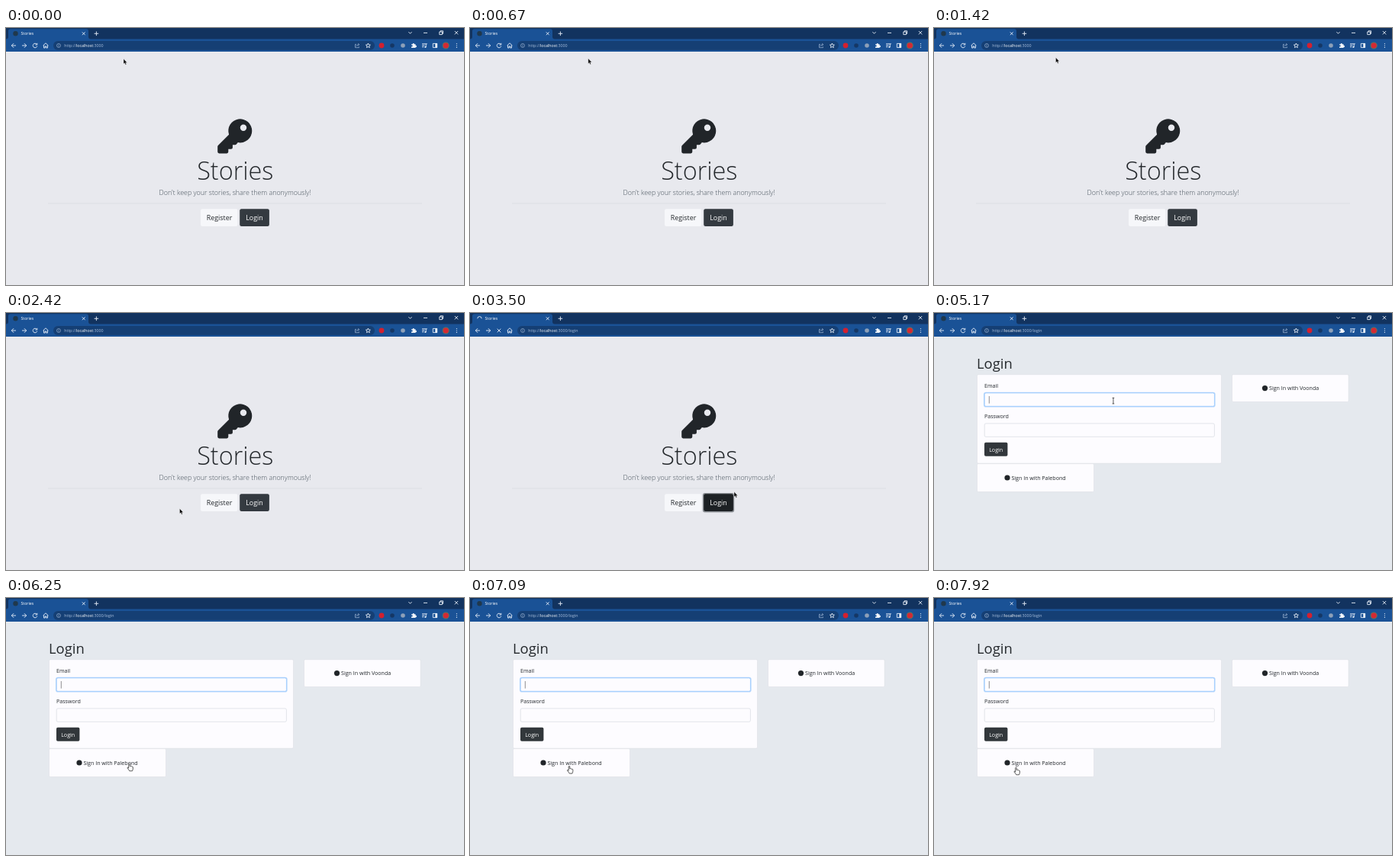
Animation, 600 px wide and 337 px high, one loop 8000 ms. Source, as an HTML page:

```html
<!DOCTYPE html>
<html lang="en">
<head>
<meta charset="utf-8">
<title>Stories</title>
<style>
  html, body { margin: 0; width: 100%; height: 100%; overflow: hidden; background: #e7e9ee; }
  svg { display: block; width: 100vw; height: 100vh; }
  text { font-family: "Open Sans", "Noto Sans", sans-serif; fill: #24282c; }
  .mid { text-anchor: middle; }
  .small { font-size: 5.3px; fill: #fff; }
  .body { font-size: 7.1px; }
  .large { font-size: 8.9px; }
  .light { font-weight: 300; }
  .white { fill: #fff; }
  .line { fill: none; stroke: #eaf1fa; stroke-width: .9; }
  .dim { stroke: #a9bfdc; }
  .card { fill: #fdfcff; stroke: #d9dbe0; stroke-width: .5; }
  .field { fill: #fdfcff; stroke: #ced4da; stroke-width: .6; }
  .dark { fill: #32373b; }
</style>
</head>
<body>
<svg viewBox="0 0 600 337" preserveAspectRatio="none">
  <g id="home">
    <rect y="31" width="600" height="306" fill="#e8e9ee"/>
    <g transform="translate(277.2 119.4) scale(.088)" fill="#212529">
      <path fill-rule="evenodd" d="M512 176A176 176 0 0 1 303 349L279 376Q272 384 261 384H224V424Q224 448 200 448H160V488Q160 512 136 512H24Q0 512 0 488V410Q0 400 7 393L169 231A176 176 0 1 1 512 176ZM336 128a48 48 0 1 0 96 0a48 48 0 1 0-96 0Z"/>
    </g>
    <text class="mid light" x="300.3" y="199" font-size="32.4">Stories</text>
    <text class="mid light" x="300" y="218.8" font-size="8.9" style="fill:#46515b">Don't keep your stories, share them anonymously!</text>
    <path d="M55 230H545" stroke="#d5d7dc" stroke-width=".6"/>
    <rect id="register" x="255" y="237.3" width="48.5" height="22.8" rx="2.3"/>
    <text class="mid large" x="279.5" y="252.3">Register</text>
    <rect id="ring" x="304.8" y="236" width="41.4" height="25.4" rx="3" fill="#8f9398"/>
    <rect id="enter" x="306.2" y="237.3" width="38.7" height="22.8" rx="2.3"/>
    <text class="mid large white" x="325.5" y="252.3">Login</text>
  </g>

  <g id="login">
    <rect y="31" width="600" height="306" fill="#e5e9ee"/>
    <text x="56" y="72.6" font-size="18.4" font-weight="500">Login</text>
    <rect class="card" x="56.5" y="80.7" width="320" height="116.4" rx="1.6"/>
    <text class="body" x="66" y="98">Email</text>
    <rect id="halo" x="65" y="103.7" width="303.6" height="19.8" rx="2.8" fill="#b9d8fb"/>
    <rect id="email" class="field" x="66.2" y="104.9" width="301.2" height="17.4" rx="1.8"/>
    <path id="caret" d="M72.3 109V118.6" stroke="#444" stroke-width=".6"/>
    <text class="body" x="66" y="138">Password</text>
    <rect class="field" x="66.2" y="144.9" width="301.2" height="17.4" rx="1.8"/>
    <rect class="dark" x="66" y="169.8" width="30.4" height="18" rx="1.8"/>
    <text class="body mid white" x="81.2" y="181.5">Login</text>
    <rect class="card" x="56.5" y="197.6" width="153" height="37" rx="1.6"/>
    <circle cx="96" cy="216" r="3.6" fill="#212529"/>
    <text class="body" x="101.4" y="218.6">Sign In with Palebond</text>
    <rect class="card" x="390.5" y="80.7" width="152.6" height="35.8" rx="1.6"/>
    <circle cx="433.5" cy="98.6" r="3.6" fill="#212529"/>
    <text class="body" x="439" y="101.2">Sign In with Voonda</text>
  </g>

  <g id="browser">
    <rect width="600" height="16" fill="#12335f"/>
    <path d="M0 31V14.5Q3 14.5 3 11.5V4Q3 1.2 6 1.2H105Q108 1.2 108 4V11.5Q108 14.5 111 14.5H600V31Z" fill="#1a5296"/>
    <circle id="icon" cx="12.5" cy="7.3" r="3.2" fill="#20384c"/>
    <path id="spinner" class="line" d="M9.8 7.3A2.7 2.7 0 0 0 12.5 10A2.7 2.7 0 0 0 15.2 7.3" stroke-width=".8"/>
    <text class="small" x="19.4" y="9.3">Stories</text>
    <path class="line" d="M99.8 5.4l3.8 3.8m0-3.8l-3.8 3.8M115.6 7.3h5.6m-2.8-2.8v5.6"/>
    <path class="line" stroke-width=".8" d="M527.4 5.2l2.1 2.1 2.1-2.1M547 6.4h5M567.8 5h3.6v3.6h-3.6zM569 5V3.8h3.6v3.6h-1.2M587.8 4l4.4 4.4m0-4.4l-4.4 4.4"/>
    <path class="line" d="M13 23H7.3m2.8-2.8L7.3 23l2.8 2.8M21 23h5.7m-2.8-2.8l2.8 2.8-2.8 2.8"/>
    <path id="reload" class="line" d="M40.2 21.2A2.8 2.8 0 1 0 40.8 23.7M40.8 19.8V22H38.5"/>
    <path id="stop" class="line" d="M35.7 20.7l4.6 4.6m0-4.6l-4.6 4.6"/>
    <path class="line" d="M48.6 23l3.4-3.2 3.4 3.2M49.6 22.5v3.6h1.6V24h1.6v2.1h1.6v-3.6"/>
    <rect x="62" y="17" width="421" height="12" rx="6" fill="#153f74"/>
    <g class="line dim" stroke-width=".6">
      <circle cx="69" cy="23" r="2.5" stroke-width=".6"/>
      <path d="M69 22.6v1.8M69 21.3v.6" stroke-width=".7"/>
      <path d="M459 21.4h-1.5v4.3h5v-1.2M459 24q.3-2.3 3.6-2.3m-1.4-1.5l1.6 1.5-1.6 1.5" stroke-width=".7"/>
    </g>
    <text class="small" x="76.3" y="25" style="fill:#a9bfdc">http://<tspan fill="#fff">localhost</tspan><tspan>:3000</tspan><tspan id="path"></tspan></text>
    <path class="line" stroke-width=".6" d="M474.4 20l.9 2 2.1.2-1.6 1.4.5 2.1-1.9-1.1-1.9 1.1.5-2.1-1.6-1.4 2.1-.2z"/>
    <circle cx="492" cy="23" r="3.4" fill="#d3202f"/>
    <circle cx="506" cy="23" r="2.8" fill="#153764"/>
    <circle cx="520" cy="23" r="2.8" fill="#8da0b8"/>
    <path fill="#f2f6fb" d="M531 21.2h1.7a1.1 1.1 0 1 1 2.2 0h1.7V23a1.1 1.1 0 1 1 0 2.1V26H531v-1.7a1.1 1.1 0 1 0 0-1.8z"/>
    <path class="line" d="M545 20.8h5.2M545 22.8h3.4M545 24.8h2.4M550.2 25V20.8h1.6"/>
    <circle cx="549.4" cy="25" r="1.1" fill="#eaf1fa"/>
    <path class="line" d="M559.3 20.4h5.4v5.2h-5.4z"/>
    <path fill="#eaf1fa" d="M562.3 20h2.5v6h-2.5z"/>
    <circle cx="576.2" cy="23" r="4.1" fill="#d42a33" stroke="#4f7d68" stroke-width=".9"/>
    <path d="M590.4 20.6v.01m0 2.39v.01m0 2.39v.01" stroke="#eaf1fa" stroke-width="1.2" stroke-linecap="round"/>
  </g>

  <g id="cursor">
    <path id="arrow" d="M0 0V6.6L1.5 5.3 2.5 7.7 3.7 7.2 2.7 4.9H4.7Z" fill="#080808" stroke="#fff" stroke-width=".35"/>
    <path id="hand" d="M-.8.6Q0-.5.8.6V3.6Q1.7 2.9 2.3 3.8 3.1 3.2 3.7 4.2 4.7 3.8 4.8 5V7Q4.7 8.3 3.9 9.8H.3Q-.6 8.1-2.4 6.2-2.8 5-1.8 5.2L-.8 6.1Z" fill="#fff" stroke="#151515" stroke-width=".7"/>
    <path id="beam" d="M-1.3-3.8H1.3M0-3.8V3.8M-1.3 3.8H1.3" stroke="#151515" stroke-width=".7"/>
  </g>
</svg>
<script>
const LOOP = 8000, STEP = 1000 / 12;
const CLICK = 3400, LOADED = 3740, FOCUS = 4700, BLINK = 530;

// time, x, y of the pointer tip
const route = [
  [0, 154, 40.5], [900, 155, 40], [1420, 159.5, 38.8], [1720, 160, 42],
  [2330, 227, 256], [2500, 228, 257], [2700, 244, 259], [3080, 322, 253],
  [3400, 333, 247], [3500, 346, 234.5], [3800, 392, 160], [4170, 408.5, 142],
  [4350, 390, 136], [4660, 250, 115], [5150, 235, 115], [5920, 165, 215],
  [6250, 161.5, 217], [6700, 158, 218], [7400, 109, 222], [7920, 107.5, 222]
];

const el = id => document.getElementById(id);
const show = (id, on) => el(id).setAttribute("display", on ? "inline" : "none");
const fill = (id, color) => el(id).setAttribute("fill", color);
const inside = ([x, y], l, t, r, b) => x >= l && x <= r && y >= t && y <= b;

function pointerAt(t) {
  const next = route.findIndex(key => key[0] > t);
  if (next < 0) return route.at(-1).slice(1);
  const [t0, x0, y0] = route[next - 1], [t1, x1, y1] = route[next];
  const p = (t - t0) / (t1 - t0), e = p * p * (3 - 2 * p);
  return [x0 + (x1 - x0) * e, y0 + (y1 - y0) * e];
}

function render(t) {
  const tip = pointerAt(t), onLogin = t >= LOADED;
  const clicked = t >= CLICK, loading = clicked && !onLogin;
  const focused = t >= FOCUS;
  const overRegister = !onLogin && inside(tip, 255, 237, 303, 260);
  const overEnter = !onLogin && inside(tip, 306, 237, 345, 260);
  const overCard = onLogin && (inside(tip, 56, 198, 210, 235) || inside(tip, 390, 80, 543, 117));
  const overField = onLogin && (inside(tip, 66, 105, 368, 122) || inside(tip, 66, 145, 368, 162));
  const hand = overRegister || overEnter || overCard;

  show("home", !onLogin);
  show("login", onLogin);
  fill("register", overRegister ? "#e0e4e9" : "#f6f7fa");
  fill("enter", clicked ? "#1d2124" : overEnter ? "#23272b" : "#343a40");
  show("ring", loading);

  show("halo", focused);
  el("email").style.stroke = focused ? "#80bdff" : "";
  show("caret", focused && (t - FOCUS) % (2 * BLINK) < BLINK);

  el("path").textContent = clicked ? "/login" : "";
  show("icon", !loading);
  show("spinner", loading);
  el("spinner").setAttribute("transform", `rotate(${-t * .36} 12.5 7.3)`);
  show("reload", !loading);
  show("stop", loading);

  el("cursor").setAttribute("transform", `translate(${tip})`);
  show("hand", hand);
  show("beam", overField);
  show("arrow", !hand && !overField);
}

const start = performance.now();
function tick() {
  const t = (performance.now() - start) % LOOP;
  render(Math.floor(t / STEP) * STEP);
  requestAnimationFrame(tick);
}
tick();
</script>
</body>
</html>
```
